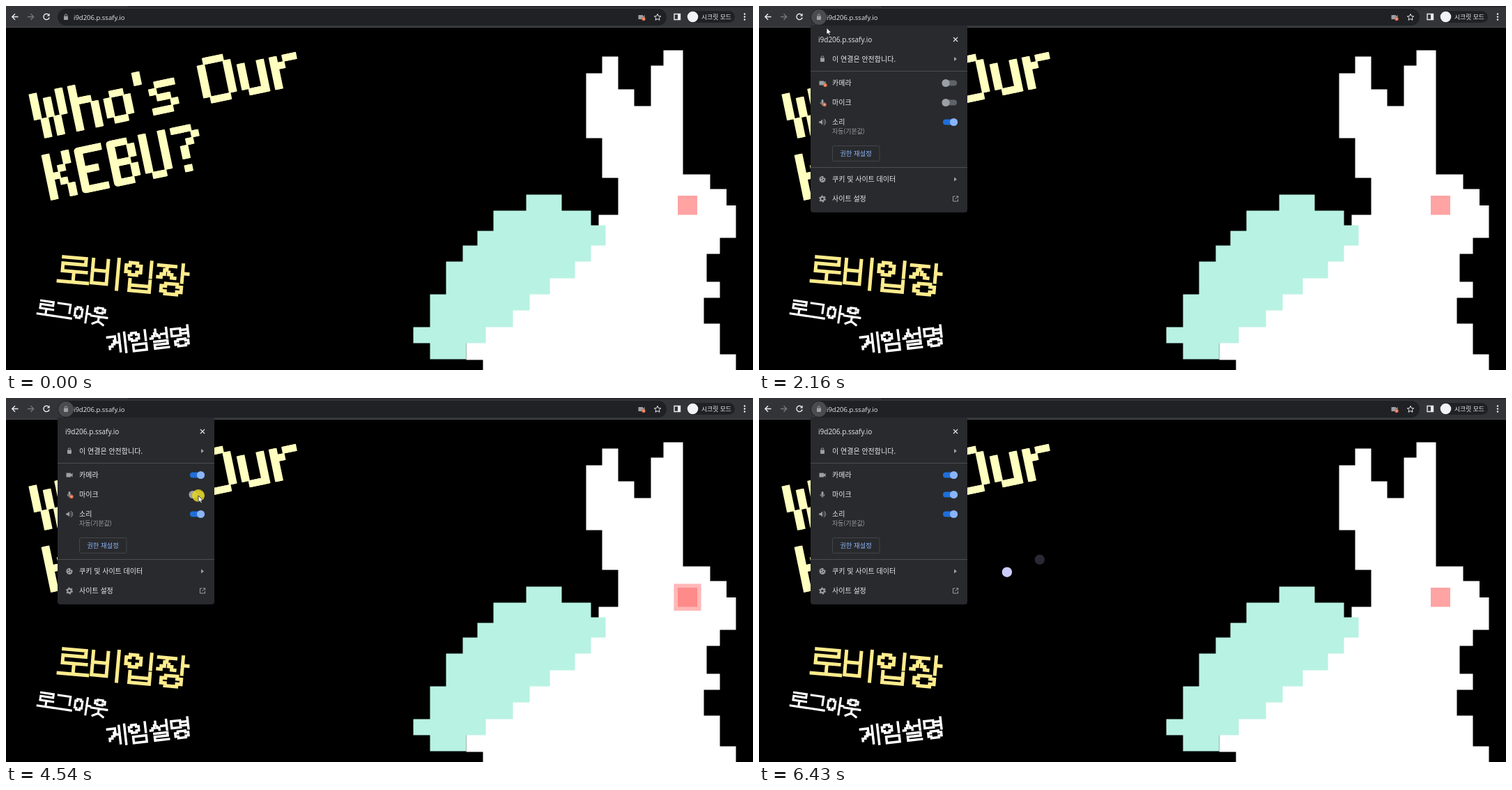
Animation, 1072 px wide and 522 px high, one loop 6.5 s. Source, as an HTML page:

```html
<!DOCTYPE html>
<html lang="ko">
<head>
<meta charset="utf-8">
<title>Lobby</title>
<style>
html, body { margin: 0; width: 100%; height: 100%; overflow: hidden; background: #000; }
svg { display: block; width: 1072px; height: 522px; }
text { font: 10px "Noto Sans CJK KR", "Noto Sans CJK", "Noto Sans", sans-serif; fill: #e8eaed; }
.url { font-family: "Open Sans", sans-serif; }
.px { fill: none; stroke-linecap: square; }
.line { fill: none; stroke: #e8eaed; stroke-width: 1.4; }
.icon { fill: #9aa0a6; }
</style>
</head>
<body>
<svg viewBox="0 0 1072 522" xmlns="http://www.w3.org/2000/svg">
  <defs>
    <g id="lock">
      <rect x="-3" y="-1.5" width="6" height="5.5" rx=".8" class="icon"/>
      <path d="M-1.8-1V-2.4a1.8 1.8 0 0 1 3.6 0V-1" fill="none" stroke="#9aa0a6"/>
    </g>
    <g id="cam" class="icon"><path d="M-4.5-3H2v2l2.5-2V3L2 1V3H-4.5Z"/></g>
    <g id="mic" class="icon">
      <rect x="-1.5" y="-4.5" width="3" height="6" rx="1.5"/>
      <path d="M-3-.5a3 3 0 0 0 6 0M0 2.5V4.5" fill="none" stroke="#9aa0a6"/>
    </g>
    <g id="badge">
      <circle cx="3" cy="2.5" r="2.7" fill="#d9623f"/>
      <path d="M2 1.5l2 2m0-2l-2 2" stroke="#fff" stroke-width=".8"/>
    </g>
    <path id="more" class="icon" d="M-2-3L2 0L-2 3Z"/>
  </defs>

  <rect width="1072" height="522"/>
  <g id="title" class="px" role="img" aria-label="Who's Our KEBU?" stroke-width="1.06" stroke-linejoin="round"
     transform="translate(32.7 127) rotate(-11.8) scale(9.4) translate(.5 .5)"></g>
  <g id="menu" class="px"></g>

  <g transform="translate(.5 .5)">
    <path fill="#fff" d="M943 63H971V241H1010V262H1033.5V285.5H1047V332H1024V355H1005V395H1024V418H1001V455H1024V499H1047V522H684V507H660V475L850 320V299H878V246H855V189H832V96H855V72H878V119H901V143H925V85H943Z"/>
    <path fill="#b8f2e2" d="M746 270H797V293H839V314H860V343H839V366H816V390H780V413H751V436H727V460H688V483H660V506H608V483H584V460H608V413H631V366H655V343H676V322H699V293H746Z"/>
  </g>
  <rect id="ring" fill="#ff5252"/>
  <rect id="eye" x="964" y="272" width="28" height="27.5"/>

  <circle id="trail" r="7.2" fill="#ccccff" opacity=".2"/>
  <circle id="dot" r="7.2" fill="#ccccff"/>

  <g id="toolbar">
    <rect width="1072" height="30" fill="#333438"/>
    <rect x="176" width="896" height="1.5" fill="#202124"/>
    <rect y="30" width="1072" height="1" fill="#4c4d50"/>
    <rect x="74" y="4" width="874" height="24" rx="12" fill="#202124"/>
    <path class="line" d="M17.5 15.5H9M13 11.3L8.8 15.5L13 19.7"/>
    <path class="line" style="stroke:#75767a" d="M31 15.5H39.5M35.5 11.3L39.7 15.5L35.5 19.7"/>
    <path class="line" d="M61.3 12.6A4.2 4.2 0 1 0 62.2 16.5"/>
    <path d="M62.6 10.5V14.4H58.7Z" fill="#e8eaed"/>
    <circle id="hover" cx="86" cy="16" r="11" fill="#4a4b4f"/>
    <use href="#lock" x="86" y="16"/>
    <text class="url" x="97" y="19.6" style="font-size:9.5px">i9d206.p.ssafy.io</text>
    <use href="#cam" x="912" y="16"/><use href="#badge" x="912" y="16"/>
    <path class="line" style="stroke-width:1" d="M935 11.4l1.4 3.1 3.3.3-2.5 2.2.8 3.3-3-1.8-3 1.8.8-3.3-2.5-2.2 3.3-.3Z"/>
    <path class="line" d="M959 11.5H967.5V19.5H959Z"/>
    <rect x="964" y="11" width="4" height="9" fill="#e8eaed"/>
    <rect x="977" y="7" width="69" height="17" rx="8.5" fill="#202124"/>
    <circle cx="985.5" cy="15.5" r="7.8" fill="#f1f3f4"/>
    <text x="998" y="18.6" style="font-size:8.8px">시크릿 모드</text>
    <g fill="#e8eaed"><circle cx="1060" cy="11.5" r="1.2"/><circle cx="1060" cy="15.5" r="1.2"/><circle cx="1060" cy="19.5" r="1.2"/></g>
  </g>

  <g id="popup">
    <path d="M74 28H299V292a4 4 0 0 1-4 4H78a4 4 0 0 1-4-4Z" fill="#292a2d"/>
    <path d="M74 93.5H299M74 231.5H299" stroke="#4b4c50"/>
    <text class="url" x="85" y="51.6">i9d206.p.ssafy.io</text>
    <path class="line" style="stroke-width:1.1" d="M279 45l6 6m0-6l-6 6"/>
    <use href="#lock" x="91" y="76"/>
    <text x="105" y="79.7">이 연결은 안전합니다.</text>
    <use href="#more" x="282" y="76"/>
    <use href="#cam" x="91" y="110.5"/><use id="camBadge" href="#badge" x="92" y="111"/>
    <text x="105" y="114.3">카메라</text>
    <use href="#mic" x="91" y="138.5"/><use id="micBadge" href="#badge" x="91" y="139"/>
    <text x="105" y="142.3">마이크</text>
    <path class="icon" d="M86.5 165H88.5L91 162.5V170.5L88.5 168H86.5Z"/>
    <path d="M92.5 164.5a2.5 2.5 0 0 1 0 4M92.8 162.3a4.5 4.5 0 0 1 0 8.4" fill="none" stroke="#9aa0a6"/>
    <text x="105" y="170.3">소리</text>
    <text x="105" y="183.4" style="font-size:8.9px;fill:#9aa0a6">자동(기본값)</text>
    <rect x="105.5" y="200.5" width="67.5" height="22" rx="2.5" fill="none" stroke="#43464a"/>
    <text x="139" y="214.6" text-anchor="middle" style="font-size:9.3px;fill:#8ab4f8">권한 재설정</text>
    <circle cx="91" cy="248.5" r="4.5" class="icon"/>
    <g fill="#292a2d"><circle cx="89.5" cy="247" r=".9"/><circle cx="92.5" cy="249" r=".9"/><circle cx="89.8" cy="250.5" r=".8"/><circle cx="93.8" cy="245.3" r="1.4"/></g>
    <text x="105" y="252">쿠키 및 사이트 데이터</text>
    <use href="#more" x="282" y="248.5"/>
    <circle cx="91" cy="276.5" r="2.7" fill="none" stroke="#9aa0a6" stroke-width="2"/>
    <circle cx="91" cy="276.5" r="4.2" fill="none" stroke="#9aa0a6" stroke-width="1.6" stroke-dasharray="2.2"/>
    <text x="105" y="280">사이트 설정</text>
    <path d="M281.5 273H278.5V280H285.5V277M283 272.8H285.7V275.5M285.5 273L281.5 277" fill="none" stroke="#9aa0a6"/>
    <g id="toggles"></g>
  </g>

  <circle id="halo" r="9" fill="#e6d822" opacity=".85"/>
  <path id="arrow" d="M0 0V9.6L2.2 7.6L3.8 11L5.4 10.3L3.9 7H6.9Z" fill="#fff" stroke="#000" stroke-width=".7"/>
</svg>
<script>
const LOOP = 6500, PULSE = 1070, LAG = 70;
const POPUP_AT = 2090, CAM_AT = 3760, MIC_AT = 4640;
const CLICKS = [[2000, 2110], [3630, 3770], [4500, 4620]];
const $ = id => document.getElementById(id);

function add(parent, tag, attrs) {
  const el = document.createElementNS('http://www.w3.org/2000/svg', tag);
  set(el, attrs);
  parent.append(el);
  return el;
}
function set(el, attrs) {
  for (const k in attrs) el.setAttribute(k, attrs[k]);
}
const show = (el, on) => { el.style.display = on ? '' : 'none'; };

// Pixel letters as strokes on a cell grid: [columns, path]
const LATIN = {
  W: [5, 'M0 0V3M4 0V3M2 1V3M1 4V6M3 4V6'],
  h: [4, 'M0 0V6M1 2H2M3 3V6'],
  o: [4, 'M1 2H2M0 3V5M3 3V5M1 6H2'],
  "'": [1, 'M0 0V1'],
  s: [4, 'M1 2H3M0 3h.01M1 4H2M3 5h.01M0 6H2'],
  ' ': [2, ''],
  O: [5, 'M1 0H3M0 1V5M4 1V5M1 6H3'],
  u: [4, 'M0 2V5M3 2V6M1 6H2'],
  r: [4, 'M0 2V6M1 3h.01M2 2H3'],
  K: [4, 'M0 0V6M3 0V1M2 2h.01M1 3h.01M2 4h.01M3 5V6'],
  E: [4, 'M3 0H0V6H3M0 3H2'],
  B: [4, 'M2 0H0V6H2M0 3H2M3 1V2M3 4V5'],
  U: [4, 'M0 0V5M3 0V5M1 6H2'],
  '?': [4, 'M0 0H2M3 1h.01M2 2h.01M1 3V4M1 6h.01']
};
const BOLD = .2;
["Who's Our", 'KEBU?'].forEach((line, row) => {
  let x = 0;
  for (const ch of line) {
    const [cols, d] = LATIN[ch];
    for (const dx of [0, BOLD])
      add($('title'), 'path', { d, transform: `translate(${x + dx} ${row * 9.47})` });
    x += cols + 1;
  }
});

const RING_TOP = 'M3 1H6.4V2.3H8.2V5.3H6.4V6.6H3V5.3H1.2V2.3H3Z';
const RING_LOW = 'M5 9.3H10.5V10.5H12.5V12.9H10.5V14.1H5V12.9H3V10.5H5Z';
const HANGUL = {
  로: 'M2.3 1H13V4H2.3V7.5H13.5M7.7 8V12M.8 12.5H14.5',
  비: 'M1 1V12H8V1M1 6H8M13 0V14',
  입: RING_TOP + 'M13 0V7M3.5 9V14H13V9M3.5 11.5H13',
  장: 'M1 1H9M5 1V3H4V5H2.5V6.5H1M6 4V5H7.5V6.5H9M12.5 0V8M12.5 4H15' + RING_LOW,
  그: 'M2 1H12.5V8M1 12.5H14.5',
  아: 'M3.5 2H6.5V3.5H8V9.5H6.5V11H3.5V9.5H2V3.5H3.5ZM12 0V14M12 6.5H15',
  웃: 'M5.5 0H10V1H12V3.3H10V4.3H5.5V3.3H3.5V1H5.5ZM1 7.5H14.5M7.5 7.5V11.5L3 14M7.5 11.5L12 14',
  게: 'M1 2H6.5V5H5.5V7.5H4V9H2V10.5M6.5 6.5H9.5M9.5 .5V13M13.5 0V14',
  임: RING_TOP + 'M13 0V7M3.5 9.5H13V14H3.5Z',
  설: 'M5 .5V3H4V5H2.5V6.5H1M6 4V5H7.5V6.5M9 4H13M13 0V7M3.5 9H13V11.3H3.5V14H13.5',
  명: 'M1 1.5H7.5V6.5H1ZM8 2.7H13M8 5.3H13M13 0V8' + RING_LOW
};
function menuItem(word, x, y, angle, unit, step, weight, color) {
  const g = add($('menu'), 'g', {
    role: 'img', 'aria-label': word, stroke: color, 'stroke-width': weight / unit,
    transform: `translate(${x} ${y}) rotate(${angle}) scale(${unit})`
  });
  [...word].forEach((ch, i) =>
    add(g, 'path', { d: HANGUL[ch], transform: `translate(${i * step / unit} 0)` }));
}
menuItem('로비입장', 76, 356, 5, 3.05, 47, 5, '#ffec8c');
menuItem('로그아웃', 47, 420, 8.5, 1.68, 25.5, 3.1, '#fff');
menuItem('게임설명', 143, 471.5, -6.5, 1.98, 30.7, 3.5, '#fff');

function toggle(y) {
  const track = add($('toggles'), 'rect', { x: 264, y: y - 4, width: 20, height: 8, rx: 4 });
  const knob = add($('toggles'), 'circle', { cy: y, r: 5.6 });
  return on => {
    set(track, { fill: on ? '#1f6fd8' : '#5f6368' });
    set(knob, { cx: on ? 279.5 : 268, fill: on ? '#8ab4f8' : '#9aa0a6' });
  };
}
const camera = toggle(110.5), mic = toggle(138.5);
toggle(166.5)(true);

// Pointer path: time, x, y
const PATH = [
  [130, 1085, 317], [350, 890, 305], [550, 560, 262], [770, 215, 178], [840, 163, 122],
  [910, 125, 72], [980, 104, 38], [1050, 98, 20], [1200, 95, 15], [1540, 94, 20],
  [1810, 93, 22], [2140, 93, 22], [2230, 110, 62], [2440, 160, 125], [2580, 176, 141],
  [2930, 178, 143], [3350, 268, 113], [3560, 275, 111], [3970, 275, 111], [4260, 276, 138],
  [4540, 276, 140], [4680, 277, 141], [5000, 300, 150], [5310, 470, 180], [5520, 522, 187],
  [5660, 525, 188], [6160, 525, 188], [6290, 460, 209], [6360, 403, 231], [6430, 356, 249],
  [6500, 315, 262]
];
function pointer(t) {
  const i = PATH.findIndex(p => p[0] > t);
  if (i < 1) return PATH[i < 0 ? PATH.length - 1 : 0].slice(1);
  const [t0, x0, y0] = PATH[i - 1], [t1, x1, y1] = PATH[i];
  const k = (t - t0) / (t1 - t0);
  return [x0 + (x1 - x0) * k, y0 + (y1 - y0) * k];
}

function drawPulse(t) {
  const phase = t / PULSE % 1;
  set($('title'), { stroke: phase < .4 || phase > .95 ? '#ffffbf' : '#ffff00' });

  const grow = Math.min(1, phase / .72) ** .85;
  const active = t > 130 && phase > .03 && phase < .72;
  const alpha = active ? .04 + .62 * (1 - grow) : 0;
  const r = 14 * grow;
  show($('ring'), active);
  set($('ring'), { x: 964 - r, y: 272 - r, width: 28 + 2 * r, height: 27.5 + 2 * r, opacity: alpha });
  const tone = Math.round(163 - 60 * alpha);
  set($('eye'), { fill: `rgb(255,${tone},${tone})` });
}

function drawPointer(t, open) {
  const [x, y] = pointer(t), [tx, ty] = pointer(t - LAG);
  const onPage = y > 30 && !(open && x > 74 && x < 299 && y < 296);
  const seen = t >= 130;
  show($('dot'), seen && onPage);
  show($('trail'), seen && onPage);
  show($('arrow'), seen && !onPage);
  show($('halo'), CLICKS.some(([a, b]) => t >= a && t < b));
  set($('dot'), { cx: x + .5, cy: y + .5 });
  set($('trail'), { cx: tx + .5, cy: ty + .5 });
  set($('halo'), { cx: x, cy: y });
  set($('arrow'), { transform: `translate(${x} ${y})` });
}

function draw(now) {
  const t = now % LOOP, open = t >= POPUP_AT;
  drawPulse(t);
  drawPointer(t, open);
  show($('hover'), t >= 1200);
  show($('popup'), open);
  show($('camBadge'), t < CAM_AT);
  show($('micBadge'), t < MIC_AT);
  camera(t >= CAM_AT);
  mic(t >= MIC_AT);
}

const start = performance.now();
function tick() {
  draw(performance.now() - start);
  requestAnimationFrame(tick);
}
tick();
</script>
</body>
</html>
```
